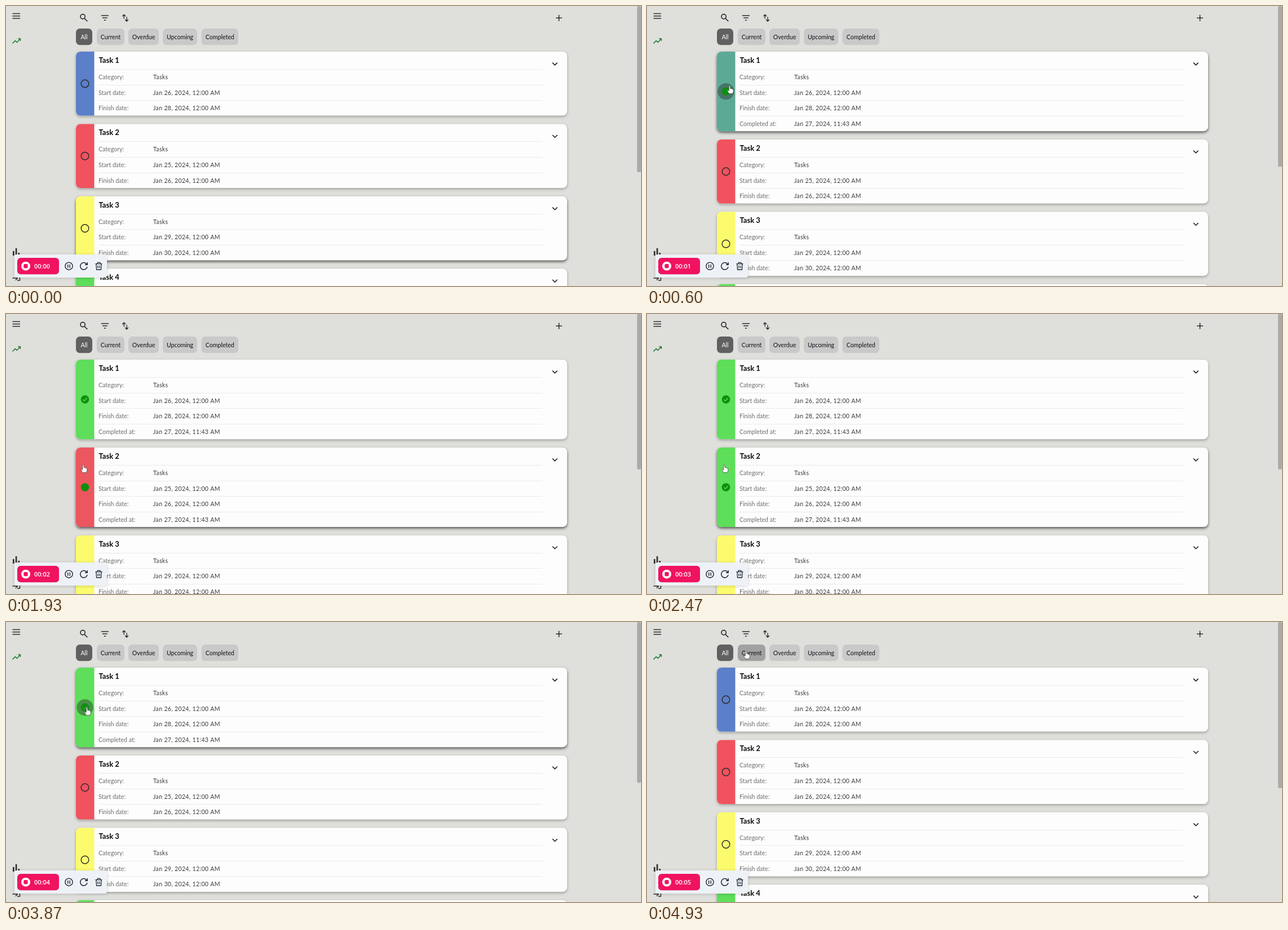
An HTML page with a canvas for the animation above (4.99 s loop, 1126 by 497 pixels).

```html
<!DOCTYPE html>
<html lang="en">
<head>
<meta charset="utf-8">
<title>Task list</title>
<style>
html, body { margin: 0; width: 100%; height: 100%; overflow: hidden; background: #dfdfdc; }
canvas { display: block; }
</style>
</head>
<body>
<canvas id="stage" width="1126" height="497"></canvas>
<script>
const ctx = document.getElementById('stage').getContext('2d');
const LOOP = 4990, FADE = 300, INK = '#2e2e2e', GREEN = [94, 222, 90];
const CARD_X = 124, CARD_W = 871, STRIP_W = 32.5, CARD_H = 113.6, ROW_H = 27.55, GAP = 14.8;

const tasks = [
  { color: [91, 127, 201], start: 'Jan 26', finish: 'Jan 28', on: 460, off: 3990 },
  { color: [240, 82, 95], start: 'Jan 25', finish: 'Jan 26', on: 1900, off: 2980 },
  { color: [251, 251, 109], start: 'Jan 29', finish: 'Jan 30', on: Infinity, off: Infinity },
  { color: GREEN, start: 'Jan 26', finish: 'Jan 27', on: -1000, off: Infinity }
];
const chips = [['All', 124, 29], ['Current', 161, 49], ['Overdue', 217, 54], ['Upcoming', 278, 61], ['Completed', 346.5, 65.5]];

// Fingertip path: time, x, y
const path = [
  [70, 250, 410], [440, 146.5, 141.5], [900, 146.5, 141.5], [1290, 137, 267.5], [3150, 137, 267.5],
  [3560, 143.5, 151.5], [4100, 143.5, 151.5], [4520, 170, 44], [4850, 175.5, 51.5]
];

const clamp = v => Math.min(1, Math.max(0, v));
const ease = v => v * v * (3 - 2 * v);
const rgb = c => `rgb(${c.map(Math.round)})`;
const mix = (a, b, p) => a.map((v, i) => v + (b[i] - v) * p);

function cursorAt(t) {
  if (t <= path[0][0]) return path[0].slice(1);
  const i = path.findIndex(k => k[0] > t);
  if (i < 0) return path[path.length - 1].slice(1);
  const [t0, ...from] = path[i - 1], [t1, ...to] = path[i];
  return mix(from, to, ease((t - t0) / (t1 - t0)));
}

function box(x, y, w, h, r, fill) {
  ctx.beginPath();
  ctx.roundRect(x, y, w, h, r);
  ctx.fillStyle = fill;
  ctx.fill();
}

function disc(x, y, r, fill) {
  ctx.beginPath();
  ctx.arc(x, y, r, 0, 7);
  ctx.fillStyle = fill;
  ctx.fill();
}

function stroke(d, color = INK, width = 1.6, x = 0, y = 0) {
  ctx.save();
  ctx.translate(x, y);
  ctx.strokeStyle = color;
  ctx.lineWidth = width;
  ctx.stroke(new Path2D(d));
  ctx.restore();
}

function text(str, x, y, font, color, spacing = 0, align = 'left') {
  ctx.font = font;
  ctx.letterSpacing = spacing + 'px';
  ctx.textAlign = align;
  ctx.fillStyle = color;
  ctx.fillText(str, x, y);
}

function shadow(alpha, blur, dy) {
  ctx.shadowColor = `rgba(0,0,0,${alpha})`;
  ctx.shadowBlur = blur;
  ctx.shadowOffsetY = dy;
}

function drawHeader(cx, cy) {
  stroke('M11.5 13.5H25 M11.5 17.7H25 M11.5 21.9H25', INK, 1.5);
  stroke('M11.5 66.5L16.3 61.5 19.3 64.5 25 58.5 M21.3 58H25.4V62', '#1f7a2b', 1.5);
  stroke('M13.3 435V443 M18.1 430V443 M22.8 438V443', INK, 2.6);
  stroke('M11.5 483H20 M17 479.5L20.5 483 17 486.5 M20 477.5H24.5V487H20', INK, 1.5);

  stroke('M140.2 18.8a4.1 4.1 0 1 1-8.2 0a4.1 4.1 0 1 1 8.2 0 M139 22L144.3 27.2', INK, 1.7);
  stroke('M168.8 17H182 M171 21H179.8 M173.8 25.2H177', INK, 1.6);
  stroke('M209.2 22.5V15.5 M206.3 18.3L209.2 15.2 212.1 18.3 M214 19.5V27 M211.1 24L214 27.2 216.9 24', INK, 1.4);
  stroke('M980.5 15.8V26.8 M975 21.3H986', INK, 1.6);

  for (const [label, x, w] of chips) {
    const selected = label === 'All';
    const hovered = cx > x && cx < x + w && cy > 40 && cy < 69;
    box(x, 40, w, 29.3, 7, selected ? '#606060' : hovered ? '#a1a1a1' : '#c9c9c9');
    text(label, x + w / 2, 58.5, '10.6px Lato, sans-serif', selected ? '#fff' : '#111', 0, 'center');
  }
}

function drawCheck(y, color, progress, hovered) {
  disc(140, y, 7.3, '#0b8f0e');
  if (!progress) return;
  ctx.save();
  ctx.setLineDash([progress * 11, 20]);
  const tick = 'M-3.6 .2L-1.1 2.7 3.7 -2.3';
  stroke(tick, color, 1.4, 140, y);
  if (hovered) stroke(tick, 'rgba(45,50,45,.45)', 1.4, 140, y);
  ctx.restore();
}

function drawCard(task, i, top, t, cx, cy) {
  const done = t >= task.on && t < task.off;
  const p = ease(clamp((t - task.on) / FADE)) - ease(clamp((t - task.off) / FADE));
  const h = CARD_H + (done ? ROW_H : 0);
  const hovered = cx > CARD_X && cx < CARD_X + CARD_W && cy > top && cy < top + h;
  const color = rgb(mix(task.color, GREEN, p));
  const mid = top + h / 2;

  if (hovered) shadow(.62, 5, 2.5); else shadow(.3, 5, 2);
  box(CARD_X, top, CARD_W, h, 8, '#fdfdfd');
  shadow(0, 0, 0);
  box(CARD_X, top, STRIP_W, h, [8, 0, 0, 8], color);

  const onButton = Math.hypot(cx - 140, cy - mid) < 15;
  if (onButton) disc(140, mid, 14.7, 'rgba(45,50,45,.45)');
  if (done) drawCheck(mid, color, clamp(2 * p - 1), onButton);
  else stroke('M6.8 0a6.8 6.8 0 1 1-13.6 0a6.8 6.8 0 1 1 13.6 0', INK, 1.5, 140, mid);

  text('Task ' + (i + 1), 164.5, top + 20, 'bold 13px Lato, sans-serif', '#080808');
  stroke('M-4.3 -2.1L0 2.2 4.3 -2.1', '#222', 1.6, 973.3, top + 21.7);

  const rows = [['Category:', 'Tasks'], ['Start date:', task.start + ', 2024, 12:00 AM'],
    ['Finish date:', task.finish + ', 2024, 12:00 AM']];
  if (done) rows.push(['Completed at:', 'Jan 27, 2024, 11:43 AM']);
  rows.forEach(([label, value], r) => {
    const y = top + 31 + r * ROW_H;
    ctx.fillStyle = '#e9eaf1';
    ctx.fillRect(164, Math.round(y), 787, 1);
    text(label, 164, y + 18, '10.6px Lato, sans-serif', '#6c6c6c');
    text(value, 261, y + 18, '10.5px Lato, sans-serif', '#3a3a3a', .35);
  });
  return top + h + GAP;
}

function drawRecorder(t) {
  shadow(.16, 6, 1);
  box(15, 441, 164, 41, 4, '#eef2f7');
  shadow(0, 0, 0);
  box(20, 447, 74, 29.3, 6, '#f0135f');
  disc(35, 461.7, 8, '#fff');
  box(31.4, 458.1, 7.2, 7.2, 1.5, '#f0135f');
  const seconds = Math.floor((t + 770) / 1000);
  text('00:0' + seconds, 50, 466, '600 11px "Open Sans", sans-serif', '#fff');
  const ink = '#1d2635';
  stroke('M6.6 0a6.6 6.6 0 1 1-13.2 0a6.6 6.6 0 1 1 13.2 0 M-1.8 -3V3 M1.8 -3V3', ink, 1.4, 111.5, 461.7);
  stroke('M6 1.2A6.2 6.2 0 1 1 4.2 -4.4L6 -2.6 M6.2 -6.6V-2.4H2', ink, 1.5, 138, 461.7);
  stroke('M-6 -4H6 M-2.4 -4V-6.3H2.4V-4 M-4.6 -4L-4 6.3H4L4.6 -4 M-1.5 -1V3.6 M1.5 -1V3.6', ink, 1.3, 164.5, 461.7);
}

function drawHand(x, y) {
  const hand = new Path2D('M-1.2 .9Q0 -.9 1.2 .9V5Q2.6 4.3 3.3 5.6Q4.6 5 5.2 6.3Q6.8 6 6.8 7.6V10.4L5.4 14H-1.2L-3.8 9.4Q-4.4 7.6 -2.8 7.8L-1.2 9.2Z');
  ctx.save();
  ctx.translate(x, y);
  ctx.fillStyle = '#fff';
  ctx.strokeStyle = '#444';
  ctx.lineWidth = .8;
  ctx.fill(hand);
  ctx.stroke(hand);
  ctx.restore();
}

function draw() {
  const t = performance.now() % LOOP;
  const [cx, cy] = cursorAt(t);
  ctx.fillStyle = '#dfdfdc';
  ctx.fillRect(0, 0, 1126, 497);
  drawHeader(cx, cy);

  let top = 81;
  tasks.forEach((task, i) => { top = drawCard(task, i, top, t, cx, cy); });

  const expanded = tasks.slice(0, 2).filter(k => t >= k.on && t < k.off).length;
  box(1119, 0, 7, 295 - expanded * 9.5, 3, '#ababab');

  drawRecorder(t);
  if (t >= path[0][0]) drawHand(cx, cy);
  requestAnimationFrame(draw);
}
ctx.lineJoin = 'round';
draw();
</script>
</body>
</html>
```
